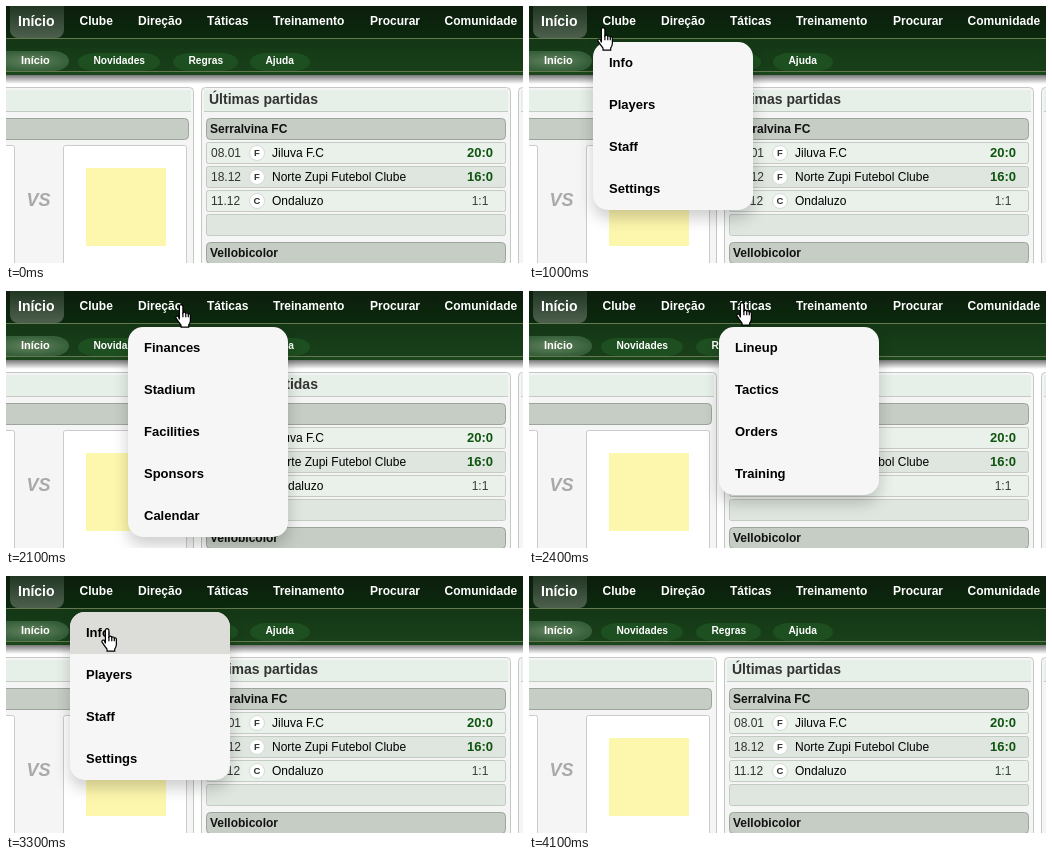
An HTML page that plays this animation: 517x257 px, repeating every 4900 ms.

```html
<!DOCTYPE html>
<html lang="pt">
<head>
<meta charset="utf-8">
<style>
html, body { margin: 0; width: 517px; height: 257px; overflow: hidden; background: #fff; }
body { position: relative; font-family: "Liberation Sans", Arial, sans-serif; }
svg { position: absolute; left: 0; top: 0; display: block; }
#menu { position: absolute; top: 36px; width: 160px; border-radius: 15px; overflow: hidden;
  background: #f6f6f6; box-shadow: 0 8px 16px rgba(0, 0, 0, .2); }
#menu div { height: 42px; padding-left: 16px; font-weight: bold; font-size: 13px; line-height: 42px; color: #000; }
#menu div.on { background: #dcdcd9; }
</style>
</head>
<body>
<svg id="page" width="517" height="257"></svg>
<div id="menu"></div>
<svg id="hand" width="18" height="26" viewBox="0 0 16.4 23.6" fill="#fff" stroke="#000" stroke-width="1.1">
  <path d="M4 14V2.2a1.6 1.6 0 0 1 3.2 0V8a1.5 1.5 0 0 1 2.6.4a1.5 1.5 0 0 1 2.3.6a1.3 1.3 0 0 1 1.9 1.2V15q0 2-1.5 4v2H5.5v-1.8Q3 16 .8 12.6a1.4 1.4 0 0 1 2.2-1.4z"/>
  <path d="M7.2 8v4M9.8 8.4V12M12.1 9v3"/>
</svg>
<script>
const rect = (x, y, w, h, fill, stroke = 'none', rx = 0, ry = rx) =>
  `<rect x="${x}" y="${y}" width="${w}" height="${h}" rx="${rx}" ry="${ry}" fill="${fill}" stroke="${stroke}"/>`;
const text = (s, x, y, size = 12, fill = '#111', extra = 'font-weight="bold"') =>
  `<text x="${x}" y="${y}" font-size="${size}" fill="${fill}" ${extra}>${s}</text>`;
const gradient = (id, from, to, kind = 'linear') =>
  `<${kind}Gradient id="${id}" ${kind == 'linear' ? 'x2="0" y2="1"' : ''}>
    <stop stop-color="${from}"/><stop offset="1" stop-color="${to}"/></${kind}Gradient>`;

function header() {
  const tabs = [['Clube', 73.5], ['Direção', 132], ['Táticas', 201], ['Treinamento', 267],
    ['Procurar', 364], ['Comunidade', 438.5]];
  const pills = [['Novidades', 72, 82], ['Regras', 167, 65], ['Ajuda', 244, 60]];
  return rect(0, 0, 517, 33, 'url(#bar)') + rect(0, 33, 517, 33, 'url(#sub)') +
    rect(0, 32, 517, 1, '#66784f') + rect(0, 65, 517, 1, '#66784f') +
    rect(0, 66, 517, 3, '#1b461c') + rect(0, 69, 517, 9, 'url(#fade)') +
    rect(4, -8, 54, 40, 'url(#tab)', 'none', 8) + text('Início', 12, 20, 14, '#fff') +
    tabs.map(([s, x]) => text(s, x, 19, 12, '#fff')).join('') +
    rect(-14, 45, 77, 20, 'url(#active)', 'none', 16, 10) + text('Início', 15, 58, 11, '#fff') +
    pills.map(([s, x, w]) => rect(x, 47, w, 18, '#1e4f20', 'none', 16, 9) +
      text(s, x + 15.5, 58, 10.2, '#fff')).join('');
}

const panel = (x, w) => rect(x + .5, 81.5, w, 200, '#f5f5f5', '#c4c8c4', 4) +
  rect(x + 3, 84, w - 5, 21, '#e7f0e8') + rect(x + 3, 105, w - 5, 1, '#c3cbc3');
const section = (x, y, w) => rect(x + .5, y + .5, w, 21, '#c5cdc4', '#9ca59c', 4);

function matches() {
  const rows = [['08.01', 'F', 'Jiluva F.C', '20:0'], ['18.12', 'F', 'Norte Zupi Futebol Clube', '16:0'],
    ['11.12', 'C', 'Ondaluzo', '1:1'], []];
  return rows.map(([date, side, name, score], i) => {
    const y = 136 + i * 24, box = rect(200.5, y + .5, 299, 21, i % 2 ? '#dee6df' : '#e9f1ea', '#c3cbc3', 2);
    if (!date) return box;
    const draw = score == '1:1';
    return box + text(date, 205, y + 15, 12, '#333', '') +
      `<circle cx="251" cy="${y + 11}" r="7.5" fill="#fff" stroke="#d5dbd5"/>` +
      text(side, 251, y + 14.3, 9.5, '#333', 'font-weight="bold" text-anchor="middle"') +
      text(name, 266, y + 15, 12, '#000', '') +
      text(score, 474, y + 15, draw ? 12 : 13, draw ? '#343' : '#0f540f',
        `text-anchor="middle" font-weight="${draw ? 'normal' : 'bold'}"`);
  }).join('');
}

page.innerHTML = '<defs>' +
  gradient('bar', '#0d1d0d', '#0a2a0d') + gradient('sub', '#143715', '#18401a') +
  gradient('fade', '#777', '#fff') + gradient('tab', '#182c1a', '#4c604d') +
  gradient('active', '#65835f', '#35603a', 'radial') + '</defs>' +
  panel(-10, 197) + section(-10, 112, 192) +
  rect(-9.5, 139.5, 18, 130, '#fff', '#cbcbcb', 2) + rect(57.5, 139.5, 123, 130, '#fff', '#cbcbcb', 2) +
  text('VS', 20.5, 200, 18, '#a9a9a9', 'font-weight="bold" font-style="italic"') +
  rect(80, 162, 80, 78, '#fdf7ad') +
  panel(195, 309) + text('Últimas partidas', 203, 98, 14, '#333') +
  section(200, 112, 299) + text('Serralvina FC', 204, 127) + matches() +
  section(200, 236, 299) + text('Vellobicolor', 204, 251) +
  panel(512, 100) + header();

const menus = [
  [2, ['Home', 'News', 'Rules', 'Ajuda']],
  [64, ['Info', 'Players', 'Staff', 'Settings']],
  [122, ['Finances', 'Stadium', 'Facilities', 'Sponsors', 'Calendar']],
  [190, ['Lineup', 'Tactics', 'Orders', 'Training']]
];

// Pointer moves: first and last step time, end point, ease-out power
const moves = [
  [500, 600, 25, 7], [700, 1000, 74, 21], [1200, 1300, 100, 20], [1600, 1700, 137, 14],
  [1900, 2400, 213, 11], [2700, 3100, 102, 19, 2], [3300, 3300, 101, 52], [3400, 3800, 30, 171]
];
const leaveBar = 3200;
const clamp = v => Math.max(0, Math.min(1, v));

function pointer(t) {
  let x = 25, y = -7;
  for (const [from, to, endX, endY, power = 1] of moves) {
    const p = 1 - (1 - clamp((t - from + 100) / (to - from + 100))) ** power;
    x += (endX - x) * p;
    y += (endY - y) * p;
  }
  return [x, y];
}

let shown;
function draw(now) {
  const t = Math.floor(now % 4900 / 100) * 100;
  if (t === shown) return;
  shown = t;
  const [x, y] = pointer(t);
  hand.style.display = t >= 500 && t <= 3800 ? 'block' : 'none';
  hand.style.transform = `translate(${Math.round(x) - 6}px, ${Math.round(y)}px)`;

  // The menu last opened in the bar stays open below it
  const [barX] = pointer(Math.min(t, leaveBar));
  const [left, items] = menus.filter(m => barX >= m[0] - 3).pop();
  const hover = x >= left ? Math.floor((y - 36) / 42) : -1;
  menu.style.left = left + 'px';
  menu.style.opacity = clamp(Math.min((t - 400) / 200, (4100 - t) / 300));
  menu.innerHTML = items.map((s, i) => `<div class="${i == hover ? 'on' : ''}">${s}</div>`).join('');
}

const start = performance.now();
function tick() {
  draw(performance.now() - start);
  requestAnimationFrame(tick);
}
tick();
</script>
</body>
</html>
```
